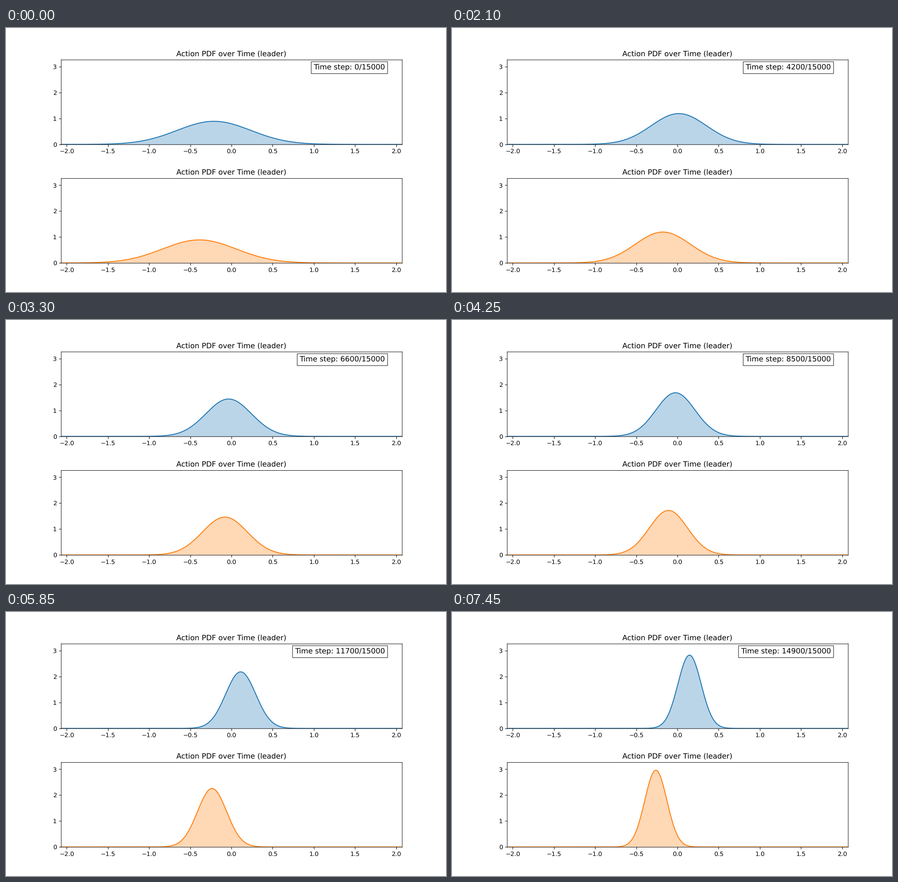
These frames come from a looping animation (966 px wide and 580 px high, 7.5 s). A matplotlib script:

```python
import numpy as np
import matplotlib.pyplot as plt
from matplotlib.animation import FuncAnimation
from matplotlib.patheffects import Stroke

DPI = 96.6
FRAMES, INTERVAL = 150, 50
STEP, TOTAL = 100, 15000
X_LIM, Y_MAX = 2.07, 3.27

plt.rcParams.update({"font.family": "DejaVu Sans", "text.hinting": "none"})

# Thin soft frame lines, drawn just inside the lower right pixel edge
FRAME_STYLE = dict(linewidth=0.72, snap=False,
                   path_effects=[Stroke(offset=(0.36, -0.36))])

# The mean wanders between a few waypoints
WAYPOINTS = [0, 23, 42, 66, 105, 129, 149]
AGENTS = [
    dict(color="tab:blue", growth=0.0081, lag=0.052,
         mean=[-0.213, -0.005, 0.016, -0.035, -0.014, 0.237, 0.146]),
    dict(color="tab:orange", growth=0.0085, lag=0.065,
         mean=[-0.39, -0.053, -0.178, -0.08, -0.142, -0.33, -0.263]),
]

x = np.linspace(-X_LIM, X_LIM, 500)


def density(agent, t):
    """Normal density whose peak grows exponentially after a slow start."""
    mean = np.interp(t, WAYPOINTS, agent["mean"])
    slow_start = agent["lag"] * (1 - np.exp(-t / 8))
    peak = 0.891 * np.exp(agent["growth"] * t - slow_start)
    return peak * np.exp(-np.pi * (peak * (x - mean)) ** 2)


def outline(y):
    return np.vstack([[x[0], 0], np.column_stack([x, y]), [x[-1], 0]])


fig, axes = plt.subplots(2, 1, figsize=(966.01 / DPI, 580.01 / DPI), dpi=DPI)
fig.subplots_adjust(left=0.125, right=0.9, bottom=0.11, top=0.88, hspace=0.4)

curves = []
for ax, agent in zip(axes, AGENTS):
    ax.set_title("Action PDF over Time (leader)")
    ax.set_xticks(np.arange(-2, 2.1, 0.5))
    ax.set_yticks(range(4))
    ax.spines[:].set(**FRAME_STYLE)
    y = density(agent, 0)
    line, = ax.plot(x, y, color=agent["color"])
    fill = ax.fill_between(x, y, color=agent["color"], alpha=0.3, linewidth=0)
    ax.set_xlim(-X_LIM, X_LIM)
    ax.set_ylim(0, Y_MAX)
    curves.append((agent, line, fill))

label = axes[0].text(0.95, 0.95, "", transform=axes[0].transAxes, fontsize=12,
                     ha="right", va="top",
                     bbox=dict(facecolor="white", **FRAME_STYLE))


def update(frame):
    for agent, line, fill in curves:
        y = density(agent, frame)
        line.set_ydata(y)
        fill.set_verts([outline(y)])
    label.set_text(f"Time step: {frame * STEP}/{TOTAL}")
    return [label]


anim = FuncAnimation(fig, update, frames=FRAMES, interval=INTERVAL,
                     repeat=True, repeat_delay=0)
plt.show()
```
